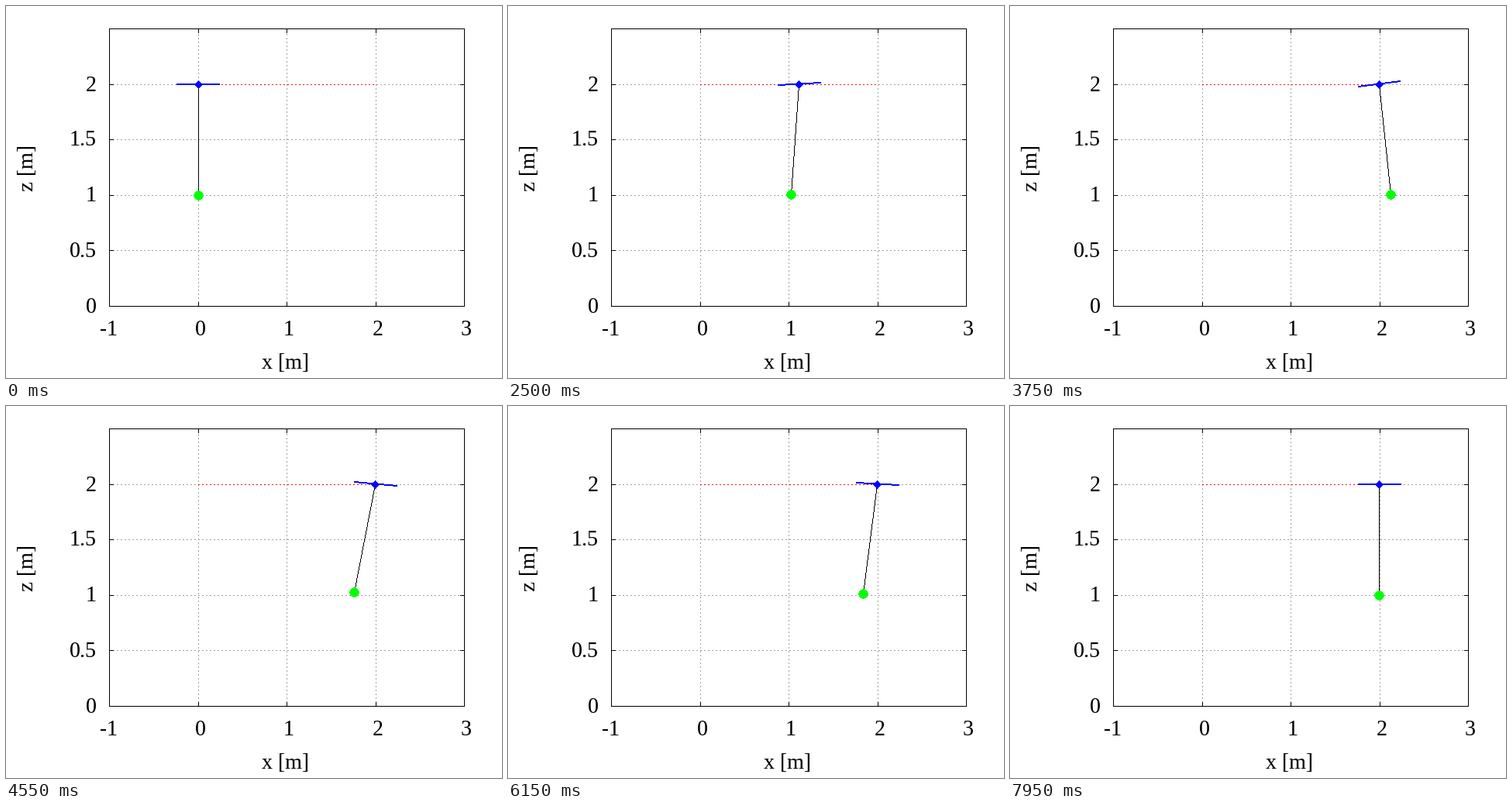
Animation of 640 by 480 pixels, one loop 8 s. Source, as a matplotlib script:

```python
import math

import matplotlib.pyplot as plt
from matplotlib.animation import FuncAnimation
from matplotlib.collections import PolyCollection
from matplotlib.patches import Circle, Polygon

plt.rcParams["text.hinting"] = "default"
plt.rcParams["text.hinting_factor"] = 1

W, H, DPI = 640, 480, 100
FRAMES, STEP_MS = 160, 50
PX = 72 / DPI                       # one pixel in points

LEFT, RIGHT, TOP, BOTTOM = 133, 591, 29, 387
SX, SZ = 114.5, 143.2               # pixels per metre

G, ROPE, GOAL, ACC = 9.81, 1.0, 2.0, 1.0
LOAD_RATIO = 0.5                    # load mass / vehicle mass
HALF_ARM = 0.24
START = 1.0
HALF_TIME = math.sqrt(GOAL / ACC)   # accelerate, then brake equally long


def accel(t):
    s = t - START
    if s <= 1e-9 or s >= 2 * HALF_TIME:
        return 0.0
    return ACC if s < HALF_TIME else -ACC


def position(t):
    s = t - START
    if s <= 0:
        return 0.0
    if s < HALF_TIME:
        return ACC * s * s / 2
    rest = max(0.0, 2 * HALF_TIME - s)
    return GOAL - ACC * rest * rest / 2


def swing():
    """Load angle and rate at every frame, integrated with RK4."""
    sub = 50
    dt = STEP_MS / 1000 / sub
    th = om = 0.0
    states = []
    for i in range(FRAMES * sub):
        if i % sub == 0:
            states.append((th, om))
        a = accel((i + 0.5) * dt)

        def f(angle):
            return -(G * math.sin(angle) + a * math.cos(angle)) / ROPE

        k1, l1 = om, f(th)
        k2, l2 = om + dt / 2 * l1, f(th + dt / 2 * k1)
        k3, l3 = om + dt / 2 * l2, f(th + dt / 2 * k2)
        k4, l4 = om + dt * l3, f(th + dt * k3)
        th += dt / 6 * (k1 + 2 * k2 + 2 * k3 + k4)
        om += dt / 6 * (l1 + 2 * l2 + 2 * l3 + l4)
    return states


def tilt(th, om, a):
    """Vehicle tilt that gives the needed thrust direction."""
    pull = LOAD_RATIO * (G * math.cos(th) + ROPE * om * om - a * math.sin(th))
    return math.atan2(a - pull * math.sin(th), G + pull * math.cos(th))


def to_px(x, z):
    return round(LEFT + (x + 1) * SX), round(BOTTOM - z * SZ)


def pixel_line(p, q, height=1):
    """Stair-stepped line as pixel cells, each just inside its pixel."""
    (x0, y0), (x1, y1) = p, q
    n = max(abs(x1 - x0), abs(y1 - y0), 1)
    cells = []
    for k in range(n + 1):
        x = math.floor(x0 + (x1 - x0) * k / n + 0.5)
        y = math.floor(y0 + (y1 - y0) * k / n + 0.5)
        l, r, t, b = x - 0.4, x + 0.4, y - height + 0.6, y + 0.4
        cells.append([(l, t), (r, t), (r, b), (l, b)])
    return cells


fig = plt.figure(figsize=(W / DPI, H / DPI), dpi=DPI, facecolor="white")
ax = fig.add_axes([0, 0, 1, 1])
ax.set_xlim(-0.5, W - 0.5)
ax.set_ylim(H - 0.5, -0.5)
ax.axis("off")


def line(xs, ys, color="black", z=2, **kw):
    ax.plot(xs, ys, color=color, lw=PX, zorder=z, antialiased=False,
            snap=False, solid_capstyle="projecting", dash_capstyle="butt",
            **kw)


def label(x, y, s, **kw):
    ax.text(x, y, s, family="Liberation Serif", fontsize=22 * 96 / DPI,
            va="baseline", **kw)


def cells(color, z):
    return ax.add_collection(
        PolyCollection([], facecolors=color, edgecolors="none", linewidths=0,
                       antialiaseds=False, snap=False, zorder=z),
        autolim=False)


# Two pixels on, three off, kept slightly inside the pixel edges.
DOTS = (0, (1.9, 3.1))
EDGE = 0.45
GRID = "#a0a0a0"
TICK = 5

for x in (248, 362, 477):
    line([x, x], [BOTTOM + EDGE, TOP], GRID, z=1, ls=DOTS)
    line([x, x], [BOTTOM, BOTTOM - TICK])
    line([x, x], [TOP, TOP + TICK])
for y in (101, 172, 244, 315):
    line([LEFT - EDGE, RIGHT], [y, y], GRID, z=1, ls=DOTS)
    line([LEFT, LEFT + TICK], [y, y])
    line([RIGHT, RIGHT - TICK], [y, y])
line([LEFT, RIGHT, RIGHT, LEFT, LEFT], [TOP, TOP, BOTTOM, BOTTOM, TOP])
line([248 - EDGE, 477], [101, 101], "red", ls=DOTS)

for s, x in (("-1", 120), ("0", 243), ("1", 357), ("2", 472), ("3", 586)):
    label(x, 424.5, s, ha="left")
for s, y in (("0", 387), ("0.5", 315), ("1", 244), ("1.5", 172), ("2", 101)):
    label(116, y + 8, s, ha="right")
label(330, 467.5, "x [m]", ha="left")
label(34.5, 238.5, "z [m]", ha="left", rotation=90, rotation_mode="anchor")

rope = cells("black", 3)
arm = cells("blue", 4)
hub = Polygon([(0, 0)] * 4, fc="blue", ec="none", zorder=5, antialiased=False)
load = Circle((0, 0), 5.6, fc="lime", ec="none", zorder=5, antialiased=False)
ax.add_patch(hub)
ax.add_patch(load)

STATES = swing()


def draw(i):
    t = i * STEP_MS / 1000
    th, om = STATES[i]
    x = position(t)
    phi = tilt(th, om, accel(t))
    qx, qy = to_px(x, 2)
    bob = to_px(x + ROPE * math.sin(th), 2 - ROPE * math.cos(th))
    dx, dz = HALF_ARM * math.cos(phi), HALF_ARM * math.sin(phi)
    rope.set_verts(pixel_line((qx, qy), bob))
    arm.set_verts(pixel_line(to_px(x - dx, 2 + dz), to_px(x + dx, 2 - dz), 2))
    hub.set_xy([(qx - 5, qy), (qx, qy - 5), (qx + 5, qy), (qx, qy + 5)])
    load.center = bob
    return rope, arm, hub, load


anim = FuncAnimation(fig, draw, frames=FRAMES, interval=STEP_MS,
                     repeat=True, repeat_delay=0)
plt.show()
```
